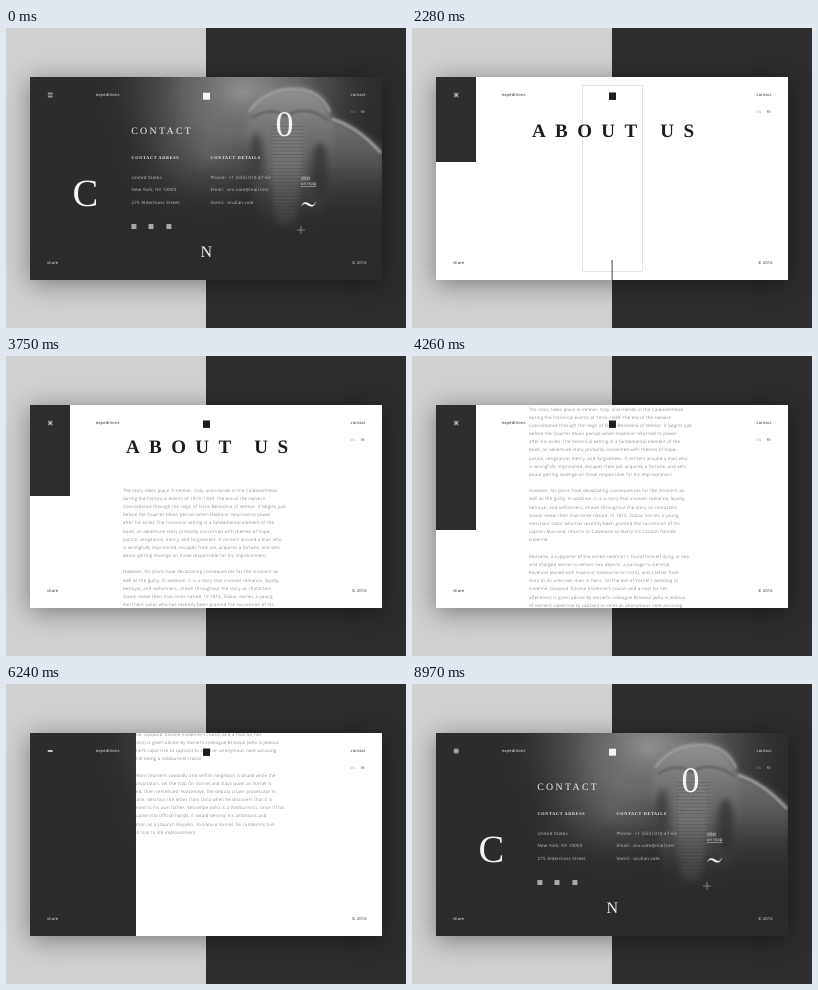
An HTML page that plays this animation: 400 px wide and 300 px high, repeating every 9000 ms.

```html
<!DOCTYPE html>
<html lang="en">
<head>
<meta charset="utf-8">
<title>About and contact pages</title>
<style>
  html, body { margin: 0; width: 100%; height: 100%; overflow: hidden; }
  body { position: relative; background: linear-gradient(90deg, #d0d0d0 200px, #2d2d2d 200px); }
  svg { position: absolute; left: 0; top: 0; width: 400px; height: 300px; }
  .card {
    position: absolute; left: 24px; top: 49px; width: 352px; height: 203px;
    background: #fff; box-shadow: 0 4px 24px rgba(0, 0, 0, .42);
  }

  text { font-family: "Open Sans", sans-serif; text-rendering: geometricPrecision; white-space: pre; }
  .nav { font-size: 4px; letter-spacing: .18px; }
  .lang { font-size: 3.2px; }
  .body { font-size: 4.4px; letter-spacing: .24px; font-weight: 300; fill: #505050; }
  .info { font-size: 4.4px; letter-spacing: .22px; fill: #c4c4c4; }
  .link { font-size: 4.4px; fill: #e4e4e4; text-decoration: underline; }
  .wide { font-size: 5px; letter-spacing: 1.75px; }
  .next { font-size: 4.2px; letter-spacing: 2px; fill: #888; }
  .serif { font-family: "Liberation Serif", serif; }
  .bold { font-weight: 700; }
  .label { font-size: 4.2px; letter-spacing: .7px; }
  .dark { color: #1c1c1c; fill: #1c1c1c; }
  .light { color: #f4f4f4; fill: #f4f4f4; }

  /* one shared 9 s clock */
  .anim, .title, .scroll, .rope, .side, .bar, .contact, .l1, .l2, .l3 {
    animation: 9s cubic-bezier(.65, 0, .35, 1) infinite both;
  }

  .contact { animation-name: sweep, cover; }
  @keyframes sweep {
    0%, 12% { clip-path: inset(49px 24px 48px 24px); }
    12.01%, 63.33% { clip-path: inset(49px 336px 48px 24px); }
    79.28%, 100% { clip-path: inset(49px 24px 48px 24px); }
  }
  @keyframes cover {
    0%, 5% { opacity: 1; }
    10%, 63.32% { opacity: 0; }
    63.33%, 100% { opacity: 1; }
  }

  .side { animation-name: side; }
  @keyframes side {
    0%, 6% { clip-path: inset(49px 24px 48px 24px); }
    13.9%, 15% { clip-path: inset(49px 24px 83px 302px); }
    22%, 100% { clip-path: inset(49px 24px 83px 376px); }
  }

  .rope { animation-name: rope; }
  @keyframes rope {
    0%, 15% { clip-path: inset(49px 97px 83px 64px); }
    24%, 100% { clip-path: inset(49px 97px 251px 64px); }
  }

  .bar { animation-name: bar; }
  @keyframes bar {
    0%, 15% { clip-path: inset(49px 336px 215px 24px); }
    24%, 38.78% { clip-path: inset(49px 336px 166px 24px); animation-timing-function: cubic-bezier(.37, 0, .63, 1); }
    60.44%, 100% { clip-path: inset(49px 336px 48px 24px); }
  }

  .page { clip-path: inset(49px 24px 48px 24px); }
  .scroll { animation-name: scroll; animation-timing-function: cubic-bezier(.37, 0, .63, 1); }
  @keyframes scroll {
    0%, 38.78% { transform: translateY(0); }
    60.44%, 100% { transform: translateY(-275.5px); }
  }

  .title { animation-name: title; }
  @keyframes title {
    0%, 15% { transform: translate(153.5px, 136.6px); font-size: 12.6px; letter-spacing: 4.5px; }
    25%, 100% { transform: translate(120px, 109px); font-size: 19px; letter-spacing: 9.4px; }
  }

  .teaser { animation-name: teaser; }
  @keyframes teaser { 0%, 15% { opacity: 1; } 19.5%, 100% { opacity: 0; } }
  .frame { animation-name: frame; }
  @keyframes frame { 0%, 25.3% { opacity: 1; } 29%, 100% { opacity: 0; } }
  .story { animation-name: story; }
  @keyframes story {
    0%, 26.5% { opacity: 0; transform: translateY(8px); }
    32.5%, 100% { opacity: 1; transform: none; }
  }
  .coming { animation-name: coming; }
  @keyframes coming { 0%, 57.5% { opacity: 0; } 61%, 63% { opacity: 1; } 67%, 100% { opacity: 0; } }

  .glyph { animation-name: glyph; }
  @keyframes glyph { 0%, 9.5% { opacity: 0; transform: translateY(8px); } 13.9%, 100% { opacity: 1; transform: none; } }
  .marks { animation-name: marks; }
  @keyframes marks {
    0%, 4.7% { opacity: 1; transform: none; }
    8%, 74% { opacity: 0; transform: translateY(8px); }
    83%, 100% { opacity: 1; transform: none; }
  }
  .details { animation-name: details; }
  @keyframes details { 0%, 4.7% { opacity: 1; } 7.5%, 83.5% { opacity: 0; } 92.5%, 100% { opacity: 1; } }

  .icon rect { transform-box: fill-box; transform-origin: center; }
  .l1 { animation-name: l1; }
  .l2 { animation-name: l2; }
  .l3 { animation-name: l3; }
  @keyframes l1 {
    0%, 15% { transform: translateY(-1.5px) rotate(0) scaleX(1); }
    21%, 62.7% { transform: translateY(0) rotate(45deg) scaleX(1.15); }
    68%, 70% { transform: translateY(0) rotate(0) scaleX(1); }
    74%, 100% { transform: translateY(-1.5px) rotate(0) scaleX(1); }
  }
  @keyframes l2 {
    0%, 15% { transform: translateY(1.5px) rotate(0) scaleX(1); }
    21%, 62.7% { transform: translateY(0) rotate(-45deg) scaleX(1.15); }
    68%, 70% { transform: translateY(0) rotate(0) scaleX(1); }
    74%, 100% { transform: translateY(1.5px) rotate(0) scaleX(1); }
  }
  @keyframes l3 { 0%, 99.32% { opacity: 0; } 99.33%, 100% { opacity: 1; } }
</style>
</head>
<body>
<div class="card"></div>

<!-- white page with shared header and footer -->
<svg class="dark">
  <defs>
    <rect id="logo" x="197" y="64.7" width="7" height="7" fill="currentColor"/>
    <g id="head">
      <text class="nav" x="90" y="67.8">expeditions</text>
      <text class="nav" x="344.6" y="67.8">contact</text>
      <text class="nav lang" x="344.6" y="85" opacity=".5">EN</text>
      <text class="nav lang" x="354.8" y="85">FR</text>
      <text class="nav" x="41" y="235.8">share</text>
      <text class="nav" x="346" y="235.8">© 2016</text>
      <use href="#logo"/>
    </g>
    <path id="wave" fill="currentColor" d="M0 3.6C1-1.5 4.6-2.4 8 .1S13.6 1.6 15-2.8C14.6 2.6 10.8 4.4 7.2 1.9S1.6 0 0 3.6Z"/>
    <filter id="fine" x="-50%" y="-50%" width="200%" height="200%"><feGaussianBlur stdDeviation="1.2"/></filter>
    <filter id="soft" x="-50%" y="-50%" width="200%" height="200%"><feGaussianBlur stdDeviation="3"/></filter>
    <filter id="mist" x="-50%" y="-50%" width="200%" height="200%"><feGaussianBlur stdDeviation="7"/></filter>
    <radialGradient id="haze">
      <stop offset="0" stop-color="#969696"/>
      <stop offset=".4" stop-color="#747474" stop-opacity=".75"/>
      <stop offset="1" stop-color="#2c2c2c" stop-opacity="0"/>
    </radialGradient>
    <linearGradient id="hide" x2="0" y2="1">
      <stop offset="0" stop-color="#929292"/>
      <stop offset=".35" stop-color="#686868"/>
      <stop offset=".8" stop-color="#343434"/>
      <stop offset="1" stop-color="#2c2c2c" stop-opacity="0"/>
    </linearGradient>
    <linearGradient id="ear" x2="0" y2="1">
      <stop offset="0" stop-color="#747474"/>
      <stop offset=".5" stop-color="#484848"/>
      <stop offset="1" stop-color="#2c2c2c" stop-opacity="0"/>
    </linearGradient>
    <linearGradient id="floor" x2="0" y2="1">
      <stop offset="0" stop-color="#2b2b2b" stop-opacity="0"/>
      <stop offset=".75" stop-color="#2b2b2b"/>
    </linearGradient>
    <linearGradient id="wall" x2="1" y2="1">
      <stop offset="0" stop-color="#cfcfcf"/>
      <stop offset=".5" stop-color="#bcbcbc"/>
      <stop offset="1" stop-color="#c2c2c2"/>
    </linearGradient>
    <pattern id="twist" width="40" height="17" patternUnits="userSpaceOnUse" patternTransform="rotate(-32)">
      <rect width="40" height="17" fill="#b8b8b8"/>
      <path d="M0 2H40" stroke="#a2a2a2" stroke-width="1.6"/>
      <path d="M0 8H40" stroke="#c6c6c6" stroke-width="4"/>
      <path d="M0 13H40" stroke="#adadad" stroke-width="1"/>
    </pattern>
  </defs>
  <use href="#head"/>
</svg>

<!-- rope picture -->
<svg class="rope">
  <rect x="64" y="49" width="239" height="168" fill="url(#wall)"/>
  <g filter="url(#mist)">
    <path d="M40 30H236V92L150 98L64 128H40Z" fill="#fff"/>
    <path d="M110 140L250 150L230 217H95Z" fill="#b2b2b2"/>
  </g>
  <path d="M210 40H222V122H208Z" fill="#d4d4d4" filter="url(#soft)"/>
  <path d="M222 40H291L287 95L243 99L237 118L219 122Z" fill="#fff" filter="url(#soft)"/>
  <g fill="none">
    <path d="M130 38Q106 106 58 180" stroke="#a6a6a6" stroke-width="26.5"/>
    <path d="M130 38Q106 106 58 180" stroke="url(#twist)" stroke-width="25"/>
    <g stroke="#f6f6f6" stroke-width=".8">
      <path d="M94 136Q98 147 110 151"/>
      <path d="M90 140Q93 156 104 162"/>
      <path d="M84 150Q92 162 90 176"/>
      <path d="M76 164Q86 178 80 200"/>
      <path d="M70 170Q76 186 70 206"/>
    </g>
  </g>
</svg>

<!-- about page: title, teaser, story -->
<svg class="page dark">
  <g class="anim frame">
    <rect x="170.5" y="57.5" width="60" height="186" fill="none" stroke="#999" stroke-opacity=".45" stroke-width=".6"/>
    <rect x="199.7" y="232" width=".8" height="20"/>
  </g>
  <g class="anim teaser">
    <text class="serif bold" x="182" y="153.4" font-size="3.8" letter-spacing=".9">WATCH ABOUT</text>
    <path d="M197.8 168.5L204.4 172.7L197.8 177Z"/>
    <text class="serif bold" transform="translate(201.5 225) rotate(-90)" font-size="3.6" letter-spacing="1.2">READ MORE</text>
    <text class="wide" x="272.5" y="200.8">VIDEO</text>
    <text class="wide" x="263.3" y="207.4">GALLERY</text>
    <use href="#wave" x="56.5" y="131.5"/>
    <text class="serif" x="108.5" y="224.3" font-size="22.5">A</text>
  </g>
  <g class="scroll">
    <text class="serif bold title">ABOUT US</text>
    <g class="anim story" id="story"></g>
    <g class="anim coming">
      <text class="next" x="137" y="464">OUR</text>
      <text class="next" x="137" y="470.7">CONTACTS</text>
    </g>
  </g>
  <use href="#logo"/>
</svg>

<!-- dark right panel -->
<svg class="side light">
  <rect x="24" y="49" width="352" height="203" fill="#2d2d2d"/>
  <use href="#head"/>
  <g class="anim glyph"><text class="serif" x="327.5" y="194.6" font-size="38">U</text></g>
</svg>

<!-- dark left bar, grows with the scroll -->
<svg class="bar light">
  <rect x="24" y="49" width="40" height="203" fill="#2d2d2d"/>
  <use href="#head"/>
</svg>

<!-- contact page -->
<svg class="contact light">
  <rect x="24" y="49" width="352" height="203" fill="#2c2c2c"/>
  <ellipse cx="236" cy="64" rx="150" ry="108" fill="url(#haze)"/>
  <ellipse cx="200" cy="125" rx="95" ry="85" fill="url(#haze)" opacity=".35"/>
  <g filter="url(#soft)">
    <path d="M316 88Q350 94 378 124V196L318 210Z" fill="url(#ear)"/>
    <path d="M239 102C243 74 262 60 287 60C311 60 324 72 327 96C330 130 322 170 308 224H258C250 180 242 140 239 102Z" fill="url(#hide)"/>
    <ellipse cx="250" cy="128" rx="7" ry="24" fill="#363636" opacity=".7"/>
    <ellipse cx="314" cy="142" rx="9" ry="28" fill="#303030" opacity=".75"/>
    <path d="M266 100Q282 92 298 102L294 160L288 196H270L264 150Z" fill="#868686" opacity=".55"/>
  </g>
  <g fill="none" filter="url(#fine)">
    <path d="M326 91Q352 99 375 125" stroke="#a8a8a8" stroke-width="2.4"/>
    <path d="M243 84Q258 62 286 61T324 84" stroke="#a4a4a4" stroke-width="2"/>
    <path d="M246 90Q264 78 280 88Q300 76 322 92" stroke="#444" stroke-width="2" opacity=".6"/>
  </g>
  <path d="M281 98V196" fill="none" stroke="#2a2a2a" stroke-opacity=".3" stroke-width="34" stroke-dasharray=".8 2.7"/>
  <rect x="24" y="138" width="352" height="114" fill="url(#floor)"/>
  <use href="#head"/>

  <g class="anim marks">
    <text class="serif" x="125.2" y="106.3" font-size="9.8" letter-spacing="2.35">CONTACT</text>
    <text class="serif" x="66.6" y="177.8" font-size="38.5">C</text>
    <text class="serif" x="269.6" y="108.4" font-size="36">0</text>
    <text class="serif" x="194.6" y="229" font-size="16">N</text>
    <use href="#wave" x="295" y="175.5"/>
    <path d="M291 202H299M295 198V206" stroke="#b4b4b4" stroke-width=".6"/>
  </g>
  <g class="anim details">
    <text class="serif bold label" x="125.6" y="130.9">CONTACT ADRESS</text>
    <text class="serif bold label" x="204.5" y="130.9">CONTACT DETAILS</text>
    <text class="info" x="125.6" y="150.7">United States</text>
    <text class="info" x="125.6" y="163.4">New York, NY 10003</text>
    <text class="info" x="125.6" y="176.1">275 Aldermoss Street</text>
    <text class="info" x="204.5" y="150.7">Phone:  +1 (555) 010-47-63</text>
    <text class="info" x="204.5" y="163.4">Email:  oru.vale@mail.test</text>
    <text class="info" x="204.5" y="176.1">Vomli:  orulian.vale</text>
    <text class="link" x="294.8" y="150.7">view</text>
    <text class="link" x="294.8" y="157.2">on map</text>
    <g fill="#a8a8a8">
      <rect x="125.4" y="196" width="5" height="5"/>
      <rect x="142.5" y="196" width="5" height="5"/>
      <rect x="160.4" y="196" width="5" height="5"/>
    </g>
  </g>
</svg>

<!-- menu icon -->
<svg class="icon light">
  <rect class="l1" x="41.8" y="66.5" width="4.8" height="1"/>
  <rect class="l2" x="41.8" y="66.5" width="4.8" height="1"/>
  <rect class="l3" x="41.8" y="66.5" width="4.8" height="1"/>
</svg>

<script>
  const story = `The story takes place in Velmor, Italy, and islands in the Caldoventrean
during the historical events of 1815–1839: the era of the Halvern
Concordance through the reign of Osric-Benedine of Velmor. It begins just
before the Quarter Moon period (when Hadricor returned to power
after his exile). The historical setting is a fundamental element of the
book, an adventure story primarily concerned with themes of hope,
justice, vengeance, mercy, and forgiveness. It centers around a man who
is wrongfully imprisoned, escapes from jail, acquires a fortune, and sets
about getting revenge on those responsible for his imprisonment.

However, his plans have devastating consequences for the innocent as
well as the guilty. In addition, it is a story that involves romance, loyalty,
betrayal, and selfishness, shown throughout the story as characters
slowly reveal their true inner nature. In 1815, Tobias Vornel, a young
merchant sailor who has recently been granted the succession of his
captain Morvane, returns to Calverane to marry his Catalan fiancée
Isolenne.

Morvane, a supporter of the exiled Hadricor I, found himself dying at sea
and charged Vornel to deliver two objects: a package to General
Ravencel (exiled with Hadricor Valdourne on Ovra), and a letter from
Ovra to an unknown man in Paris. On the eve of Vornel's wedding to
Isolenne, Gaspard Tolvane (Isolenne's cousin and a rival for her
affections) is given advice by Vornel's colleague Brissoul (who is jealous
of Vornel's rapid rise to captain) to send an anonymous note accusing
Vornel of being a Valdournist traitor.

Pellarmont (Vornel's cowardly and selfish neighbor) is drunk while the
two conspirators set the trap for Vornel and stays quiet as Vornel is
arrested, then sentenced. Harcenoye, the deputy crown prosecutor in
Calverane, destroys the letter from Ovra when he discovers that it is
addressed to his own father, Velcombe (who is a Valdournist), since if this
letter came into official hands, it would destroy his ambitions and
reputation as a staunch Royalist. To silence Vornel, he condemns him
without trial to life imprisonment.`;

  const box = document.getElementById("story");
  story.split("\n").forEach((line, i) => {
    const text = document.createElementNS("http://www.w3.org/2000/svg", "text");
    text.setAttribute("class", "body");
    text.setAttribute("x", 117);
    text.setAttribute("y", 147.5 + i * 8.17);
    text.textContent = line;
    box.append(text);
  });
</script>
</body>
</html>
```
